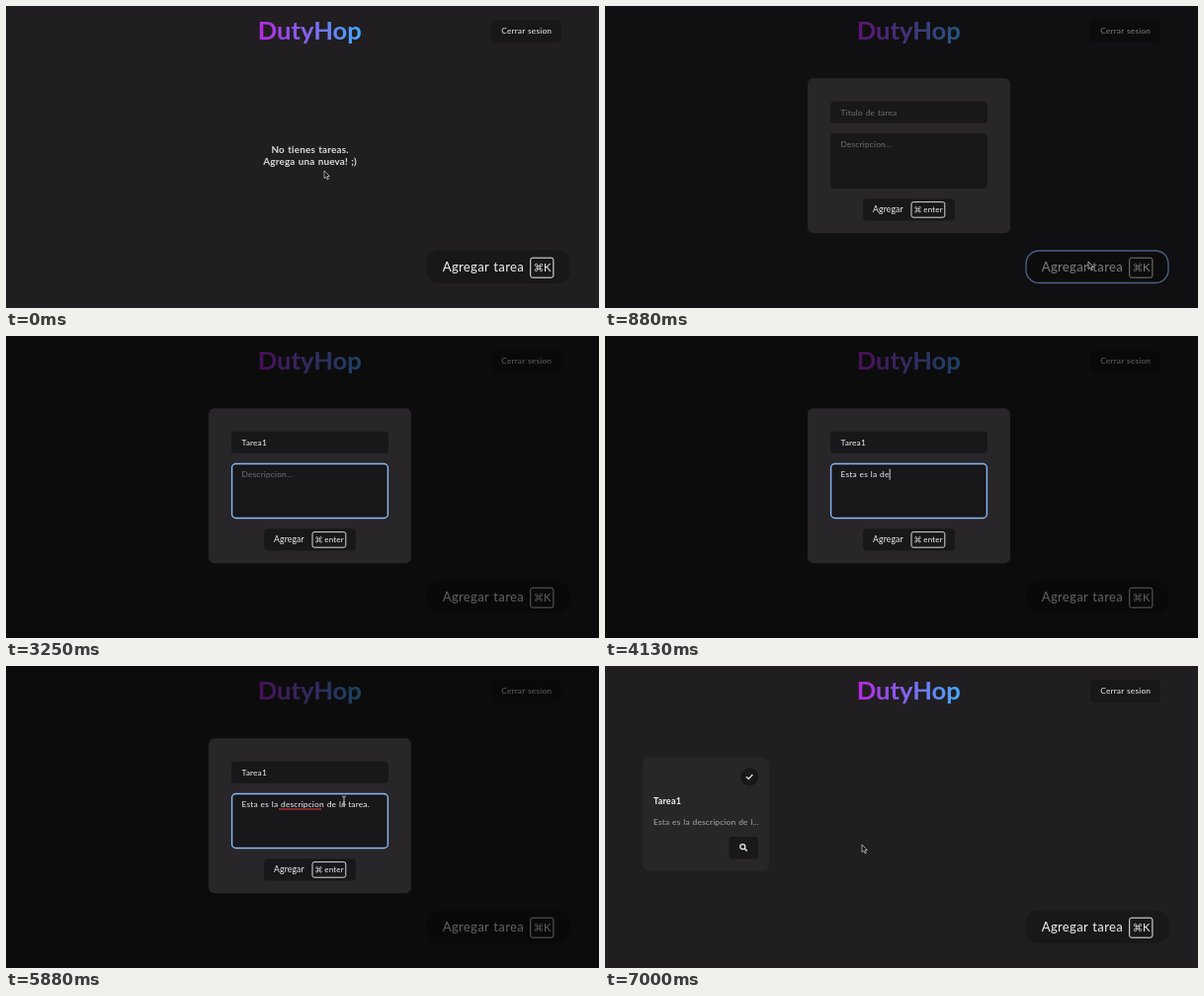
Animation of 600 by 306 pixels, one loop 7.12 s. Source, as an HTML page:

```html
<!DOCTYPE html>
<html lang="es">
<head>
<meta charset="utf-8">
<title>DutyHop</title>
<style>
  html, body { margin: 0; width: 100%; height: 100%; overflow: hidden; background: #201e21; }
  svg { display: block; width: 600px; height: 306px; }
  text {
    font: 8.4px Lato, "Open Sans", sans-serif; letter-spacing: .02em; word-spacing: .06em;
    font-variant-ligatures: none; fill: #f2f2f2; white-space: pre;
  }
  .title { font-size: 25.6px; font-weight: 700; letter-spacing: 0; fill: url(#brand); }
  .note { font-size: 9.9px; font-weight: 700; fill: #d9d8da; }
  .big { font-size: 13.1px; letter-spacing: .025em; }
  .mid { text-anchor: middle; }
  .hint { fill: #737174; }
  .soft { fill: #aaa8ab; }
  .dark { fill: #18171a; }
  .panel { fill: #282629; }
  .line { fill: none; stroke: #eee; }
  .ring { fill: none; stroke: #8abaf6; stroke-width: 1.4; }
</style>
</head>
<body>
<svg viewBox="0 0 600 306">
  <defs>
    <linearGradient id="brand" gradientUnits="userSpaceOnUse" x1="256" y1="0" x2="359" y2="0">
      <stop offset="0" stop-color="#b827e2"/>
      <stop offset="1" stop-color="#46a9fa"/>
    </linearGradient>
    <path id="loop" d="M-1.6 0V-1.6H-3.1A1.5 1.5 0 1 1 -1.6 -3.1V-1.6H0"/>
    <g id="cmd" fill="none" stroke="#eee">
      <use href="#loop"/>
      <use href="#loop" transform="rotate(90)"/>
      <use href="#loop" transform="rotate(180)"/>
      <use href="#loop" transform="rotate(270)"/>
    </g>
  </defs>

  <rect width="600" height="306" fill="#201e21"/>
  <text class="title mid" x="307.3" y="33.5">DutyHop</text>
  <rect class="dark" x="491" y="14" width="71" height="23" rx="5"/>
  <text class="mid" x="526.7" y="28">Cerrar sesion</text>

  <g id="empty">
    <text class="note mid" x="307.6" y="149">No tienes tareas.</text>
    <text class="note mid" x="307.6" y="161.2">Agrega una nueva! ;)</text>
  </g>

  <g id="card">
    <rect class="panel" x="38" y="93" width="128" height="114.5" rx="6"/>
    <circle class="dark" cx="146.2" cy="112.3" r="9"/>
    <path class="line" stroke-width="1.2" d="M143 112.3L145.2 114.4L149.4 110"/>
    <text x="49" y="140" style="font-size:9.1px;font-weight:700">Tarea1</text>
    <text class="soft" x="49" y="161.2">Esta es la descripcion de l...</text>
    <rect class="dark" x="125.5" y="173" width="29.5" height="22.5" rx="4"/>
    <circle class="line" stroke-width="1.3" cx="139.3" cy="183.1" r="2.5"/>
    <path class="line" stroke-width="1.5" d="M141.2 185L143.7 187.5"/>
  </g>

  <rect class="dark" x="425.5" y="247.5" width="145" height="33.5" rx="13"/>
  <rect id="addRing" class="ring" x="426" y="248" width="144" height="32.5" rx="13"/>
  <text class="big" x="441.7" y="269">Agregar tarea</text>
  <rect class="line" x="530.7" y="255.2" width="23.2" height="20" rx="2"/>
  <use href="#cmd" transform="translate(539 265) scale(.8)"/>
  <text x="543.9" y="269" style="font-size:11.2px">K</text>

  <rect id="shade" width="600" height="306"/>

  <g id="modal">
    <rect class="panel" x="205" y="73.3" width="205" height="157" rx="6"/>
    <rect class="dark" x="228" y="96.7" width="159" height="22" rx="4"/>
    <rect class="dark" x="228" y="129" width="159" height="56" rx="4"/>
    <rect class="dark" x="261" y="195.3" width="93" height="22.2" rx="4"/>
    <text id="nameHint" class="hint" x="238.5" y="110.6">Titulo de tarea</text>
    <text id="bodyHint" class="hint" x="238.5" y="143">Descripcion...</text>
    <text id="name" x="238.5" y="110.6"></text>
    <text id="body" x="238.5" y="143"></text>
    <path id="spell" d="M276 145H319" fill="none" stroke="#d8342f" stroke-width="1.3" stroke-dasharray="1.5 .5"/>
    <rect id="caret" width=".9" height="11" fill="#e6e6e6"/>
    <text x="271" y="209.2" style="font-size:8.6px">Agregar</text>
    <rect class="line" stroke-width=".9" x="310" y="198.6" width="33.8" height="15.6" rx="2"/>
    <use href="#cmd" transform="translate(316.5 206.4) scale(.62)"/>
    <text x="322.3" y="209.2" style="font-size:8px">enter</text>
    <rect id="focus" class="ring" rx="4"/>
  </g>

  <g id="pointer">
    <path id="arrow" d="M0 0V7.6L1.8 6L3.1 8.9L4.4 8.3L3.1 5.5H5.4Z" fill="#111" stroke="#ddd" stroke-width=".7"/>
    <path id="beam" d="M-1.9 -4.3Q0 -4.3 0 -3V3Q0 4.3 -1.9 4.3M1.9 -4.3Q0 -4.3 0 -3M0 3Q0 4.3 1.9 4.3M-1.1 1.6H1.1"
      fill="none" stroke="#d5d5d5" stroke-width=".9"/>
    <path id="hand" d="M-.8 .6Q0 -.6 .8 .6V3L3.3 3.6Q4 4 3.8 5L3 8H-1L-3 4.8Q-2.6 3.8 -.8 5Z"
      fill="#f4f4f4" stroke="#111" stroke-width=".6"/>
  </g>
</svg>
<script>
const TICK = 125, LOOP = 7120;
const $ = id => document.getElementById(id);
const show = (id, on) => $(id).style.opacity = Number(on);
const place = (id, attrs) => Object.entries(attrs).forEach(([n, v]) => $(id).setAttribute(n, v));
const within = (k, a, b) => k >= a && k < b;

// Tables are rows of [tick, values...].
const shade = [[5, 0], [6, .35], [7, .82], [8, 1], [51, 1], [52, .86], [53, .45], [54, .15], [55, 0]];
const modal = [[5, 0], [6, .3], [7, 1], [51, 1], [52, .78], [53, .35], [54, .08], [55, 0]];
const card = [[53, 0], [54, .5], [55, 1]];
const path = [[0, 322, 167], [4, 489, 259], [7, 489, 259], [12, 372, 122], [16, 346, 113],
  [46, 346, 113], [50, 330, 206], [52, 330, 206], [55, 260, 181]];
const nameKeys = [[0, 0], [18, 1], [19, 2], [20, 3], [22, 5], [23, 6]];
const bodyKeys = [[0, 0], [27, 2], [28, 4], [29, 5], [30, 8], [31, 10], [32, 11], [33, 13], [34, 15],
  [35, 18], [36, 20], [37, 22], [38, 24], [39, 26], [40, 29], [41, 31], [42, 34], [44, 35]];
const kinds = [[0, "arrow"], [11, "beam"], [18, ""], [47, "beam"], [49, "arrow"], [50, "hand"], [53, "arrow"]];
const rings = [[0, ""], [9, "name"], [24, "body"], [51, "send"], [54, ""]];
const boxes = {
  name: { x: 228.6, y: 97.2, width: 157.8, height: 21 },
  body: { x: 228.6, y: 129.5, width: 157.8, height: 55 },
  send: { x: 261.6, y: 195.8, width: 92, height: 21.3 }
};
const caretOff = [[9, 12], [16, 18], [26, 27], [45, 49]];

const held = (rows, k) => rows.findLast(r => r[0] <= k)[1];
function tween(rows, k) {
  const i = rows.findIndex(r => r[0] > k);
  if (i < 0) return rows.at(-1).slice(1);
  if (!i) return rows[0].slice(1);
  const a = rows[i - 1], b = rows[i], p = (k - a[0]) / (b[0] - a[0]);
  return a.slice(1).map((v, j) => v + (b[j + 1] - v) * p);
}

function type(id, full, count) {
  $(id).textContent = full.slice(0, count);
  show(id + "Hint", !count);
}

function draw(k) {
  show("shade", .6 * tween(shade, k)[0]);
  show("modal", tween(modal, k)[0]);
  show("card", tween(card, k)[0]);
  show("empty", k < 54);
  show("addRing", within(k, 5, 9));

  type("name", "Tarea1", held(nameKeys, k));
  type("body", "Esta es la descripcion de la tarea.", held(bodyKeys, k));
  show("spell", k >= 38);

  const ring = held(rings, k), field = ring === "name" || ring === "body";
  show("focus", ring !== "");
  if (ring) place("focus", boxes[ring]);

  show("caret", field && !caretOff.some(([a, b]) => within(k, a, b)));
  if (field) {
    const node = $(ring);
    const end = node.textContent ? node.getComputedTextLength() : 0;
    place("caret", { x: 238.7 + end, y: boxes[ring].y + 5.2 });
  }

  const kind = held(kinds, k);
  for (const id of ["arrow", "beam", "hand"]) show(id, id === kind);
  place("pointer", { transform: `translate(${tween(path, k)})` });
}

let last = -1;
const start = performance.now();
function loop() {
  const k = Math.floor((performance.now() - start) % LOOP / TICK);
  if (k !== last) draw(last = k);
  requestAnimationFrame(loop);
}
loop();
</script>
</body>
</html>
```
